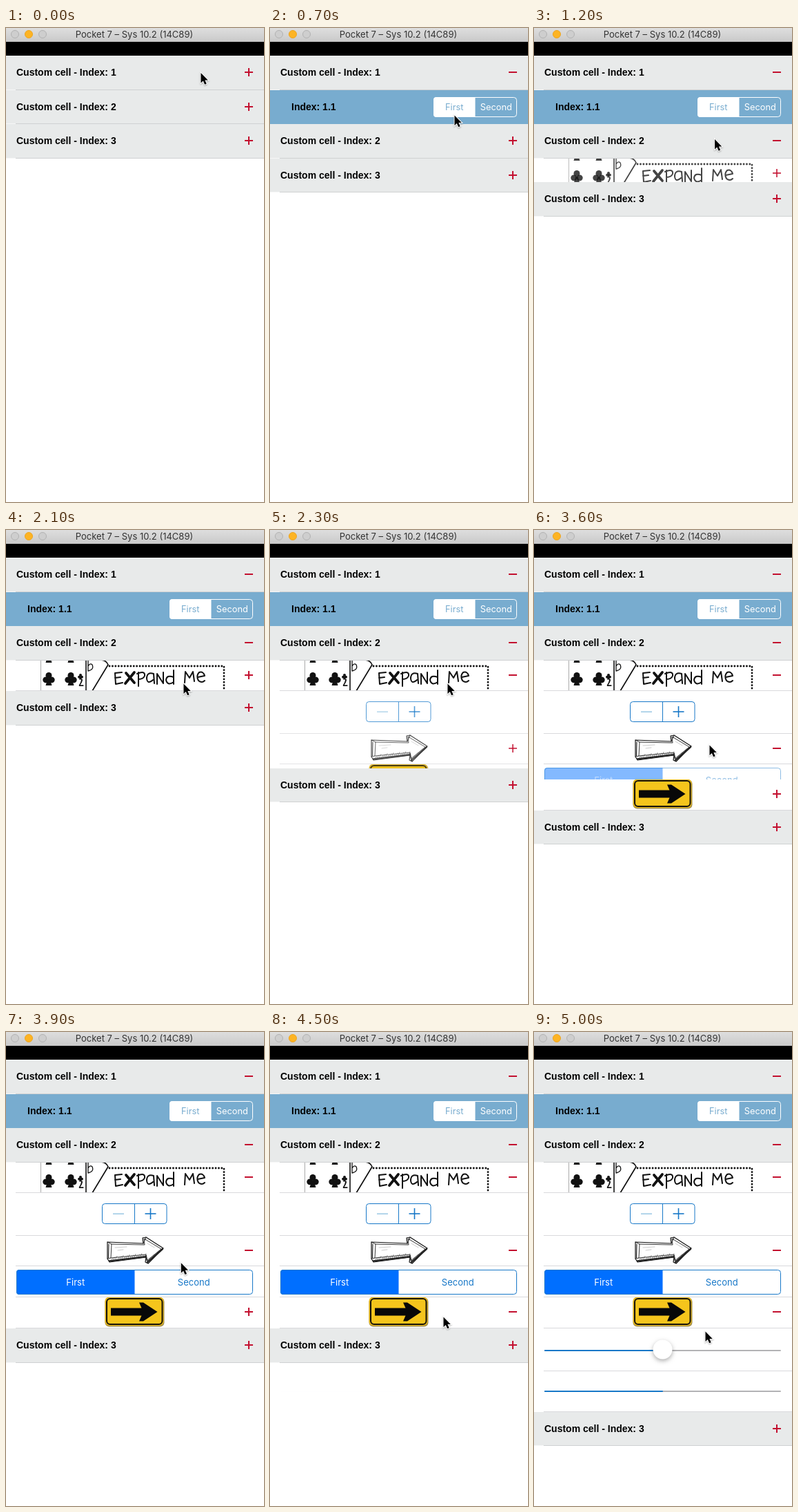
Recreate the animation shown at these times as an HTML page with a canvas. Size 374 by 686 pixels, loop 5100 ms.

```html
<!DOCTYPE html>
<html lang="en">
<head>
<meta charset="utf-8">
<title>Expandable table</title>
<style>
html, body { margin: 0; width: 374px; height: 686px; overflow: hidden; background: #fff; }
canvas { display: block; }
</style>
</head>
<body>
<canvas id="stage" width="374" height="686"></canvas>
<script>
const ctx = document.getElementById('stage').getContext('2d');
const LOOP = 5100, STEP = 100, SLIDE = 300;
const GREY = '#e8eaea', SKY = '#78accf', RED = '#c3102f', BLUE = '#1878c8', INK = '#111';
const UI = 'Inter, sans-serif';
const BOLD = 'bold 14px "Liberation Sans", Arial, sans-serif';

// Start time of each group's expansion
const opens = { first: 150, second: 990, card: 2100, sketch: 3453, sign: 4490 };

// Cursor tip: time, x, y
const cursorKeys = [
  [0, 282.5, 65], [400, 282.5, 65], [700, 267.5, 126.5], [950, 262, 161], [1250, 262, 161],
  [1800, 257.5, 222.5], [2750, 257.5, 222.5], [3350, 254.5, 311.5], [3700, 254.5, 311.5],
  [4350, 251.5, 412.5], [4750, 251.5, 412.5], [5000, 248.5, 433.5]
];

const smooth = u => { u = Math.min(1, Math.max(0, u)); return u * u * (3 - 2 * u); };
const progress = (group, t) => group ? smooth((t - opens[group]) / SLIDE) : 1;

function rect(x, y, w, h, color) {
  ctx.fillStyle = color;
  ctx.fillRect(x, y, w, h);
}

function box(x, y, w, h, r, fill, stroke, width = 1) {
  ctx.beginPath();
  ctx.roundRect(x, y, w, h, r);
  if (fill) { ctx.fillStyle = fill; ctx.fill(); }
  if (stroke) { ctx.strokeStyle = stroke; ctx.lineWidth = width; ctx.stroke(); }
}

function line(d, color, width) {
  ctx.strokeStyle = color;
  ctx.lineWidth = width;
  ctx.stroke(new Path2D(d));
}

function shape(d, color) {
  ctx.fillStyle = color;
  ctx.fill(new Path2D(d));
}

function disc(x, y, r, color) {
  ctx.beginPath();
  ctx.arc(x, y, r, 0, 7);
  ctx.fillStyle = color;
  ctx.fill();
}

function label(text, x, y, font, color, align = 'left') {
  ctx.font = font;
  ctx.fillStyle = color;
  ctx.textAlign = align;
  ctx.fillText(text, x, y);
}

function toggle(y, open) {
  rect(346, y - 1, 12, 2, RED);
  if (!open) rect(351, y - 6, 2, 12, RED);
}

function segments(x, y, w, h, main, fill, onText, offText, font) {
  box(x, y, w / 2, h, [4, 0, 0, 4], fill);
  box(x + .5, y + .5, w - 1, h - 1, 4, null, main);
  const base = y + h / 2 + 4.5;
  label('First', x + w / 4, base, font, onText, 'center');
  label('Second', x + w * .75, base, font, offText, 'center');
}

const header = n => () => label('Custom cell - Index: ' + n, 15, 30, BOLD, '#000');

function nested() {
  label('Index: 1.1', 31, 30, BOLD, '#000');
  segments(237, 11, 121, 29, '#fff', '#fff', SKY, '#fff', '12.8px ' + UI);
}

function club(x, y, s) {
  ctx.save();
  ctx.translate(x, y);
  ctx.scale(s, s);
  disc(0, -4.5, 4.5, INK);
  disc(-4.3, 1.8, 4.4, INK);
  disc(4.3, 1.8, 4.4, INK);
  shape('M-1.5 0H1.5L4.5 10H-4.5Z', INK);
  ctx.restore();
}

function card() {
  rect(50, 1, 1, 44, '#aaa');
  for (const x of [62, 94]) {
    club(x, -6, 1);
    club(x, 27, 1);
  }
  club(108, 24, .45);
  ctx.save();
  ctx.translate(109, 34);
  ctx.rotate(Math.PI);
  label('7', 0, 6, 'bold 14px "Liberation Sans", sans-serif', INK, 'center');
  ctx.restore();
  ctx.lineCap = ctx.lineJoin = 'round';
  line('M116 0V45', INK, 1.6);
  line('M119 0V16Q128 14 125 7Q122 4 119 9', INK, 1.3);
  line('M138 0Q146 1 148 7L125 45', INK, 1.7);
  ctx.setLineDash([.1, 4.3]);
  line('M150 9H316V45', INK, 2.8);
  ctx.setLineDash([]);
  line('M168 18L158 19 159 35 169 33M158 26L166 25', INK, 2);
  line('M174 19L186 33M186 18L173 34', INK, 3.8);
  line('M192 18V38M190 20Q202 15 201 23Q199 28 192 28', INK, 2);
  line('M214 20Q204 17 204 27Q205 36 213 29M214 20L215 34', INK, 2);
  line('M219 35V20L228 34V18M243 15V35M243 25Q233 21 232 29Q234 38 243 32', INK, 2);
  line('M259 33L260 17 266 26 271 17 273 31', INK, 2);
  line('M278 25L288 23Q286 16 280 18Q275 23 279 30Q284 34 288 30', INK, 2);
}

function stepper() {
  box(139.5, 16.5, 93.5, 29, 4, null, BLUE);
  rect(186, 17, 1, 28, BLUE);
  rect(155, 30.5, 16, 1.3, '#8bbfe0');
  rect(201.5, 30.2, 16, 1.6, BLUE);
  rect(208.7, 23, 1.6, 16, BLUE);
}

function sketch() {
  ctx.lineCap = ctx.lineJoin = 'round';
  line('M147 10L199 12 198 4 203 3 228 19 206 41 202 39 203 32 150 39 147 34Z', '#111', 1.2);
  line('M147 10L153 13 152 33 147 34M153 13L201 14 200 5 225 20 204 37 203 28 152 33', '#222', .9);
  line('M150 37.5L203 31M205 39L227 20', '#222', 2.4);
  line('M149 13L148.5 33M199 12L203 3M203 29L206 41', '#333', 1.2);
  let hatch = '';
  for (let i = 0; i < 17; i++) {
    const x = 152 + i * 3, y = 34 - i * .32;
    hatch += `M${x} ${y + 3}l3 ${-4 - i % 3}`;
  }
  line(hatch, '#555', .7);
  line('M158 18L175 17M162 22L170 21M205 12L215 18', '#aaa', .6);
}

function sign() {
  box(143.5, 1.5, 86, 42, 6, '#a49050');
  box(143.5, .6, 85, 41.5, 6, '#e7b91c');
  box(146, 3, 80.5, 37, 5, '#f5c51c', '#15120a', 2);
  shape('M152 16.5H196.5L193 8.5H199L219.5 22 199 35.5H193L196.5 27.5H152Z', '#080808');
}

const segmentRow = () =>
  segments(15, 6, 343, 36, BLUE, '#006fff', '#fff', BLUE, '13px ' + UI);

function track(y) {
  box(15, y, 343, 2, 1, '#b3b3b5');
  box(15, y, 172, 2, 1, BLUE);
}

function slider() {
  track(32);
  ctx.save();
  ctx.shadowColor = 'rgba(0,0,0,.32)';
  ctx.shadowBlur = 6;
  ctx.shadowOffsetY = 2.5;
  disc(186.5, 31.5, 14, '#fff');
  ctx.restore();
}

const rows = [
  { h: 49.4, bg: GREY, draw: header(1), opens: 'first' },
  { h: 49.4, bg: SKY, draw: nested, group: 'first' },
  { h: 49.4, bg: GREY, draw: header(2), opens: 'second' },
  { h: 44.5, draw: card, group: 'second', opens: 'card' },
  { h: 61.9, draw: stepper, group: 'card' },
  { h: 44.3, draw: sketch, group: 'card', opens: 'sketch' },
  { h: 45, draw: segmentRow, group: 'sketch' },
  { h: 44.8, draw: sign, group: 'card', opens: 'sign' },
  { h: 62, draw: slider, group: 'sign' },
  { h: 58.8, draw: () => track(29), group: 'sign' },
  { h: 49.4, bg: GREY, draw: header(3), opens: 'third' }
];

function drawRow(row, top, alpha, t) {
  const y = Math.round(top), h = Math.round(top + row.h) - y;
  ctx.save();
  ctx.globalAlpha = alpha;
  ctx.translate(0, y);
  ctx.beginPath();
  ctx.rect(0, 1, 374, h);
  ctx.clip();
  rect(0, 1, 374, h, row.bg || '#fff');
  row.draw();
  if (row.opens) toggle(row.bg ? 25 : 22, t > opens[row.opens]);
  if (row.bg !== SKY) {
    rect(0, h, 14, 1, row.bg ? '#f6f7f7' : '#fff');
    rect(14, h, 360, 1, row.bg ? '#cfd1d2' : '#d9d9dc');
  }
  ctx.restore();
}

function drawTable(t) {
  const placed = rows.map((row, i) => {
    const p = progress(row.group, t);
    const top = rows.slice(0, i).reduce((sum, r) =>
      sum + r.h * (row.group && r.group === row.group ? 1 : progress(r.group, t)), 39.4);
    return { row, top, p };
  });
  // Rows still fading in lie beneath the rows that slide away.
  for (const { row, top, p } of placed) if (p > 0 && p < 1) drawRow(row, top, p, t);
  for (const { row, top, p } of placed) if (p === 1) drawRow(row, top, 1, t);
}

function drawWindow() {
  const bar = ctx.createLinearGradient(0, 0, 0, 20);
  bar.addColorStop(0, '#dedede');
  bar.addColorStop(1, '#c9c9c9');
  rect(0, 0, 374, 20, bar);
  rect(0, 20, 374, 20, '#000');
  for (const x of [13, 33, 53]) {
    const lit = x === 33;
    box(x - 5.5, 3.5, 11, 11, 5.5, lit ? '#fdb424' : '#cecece', lit ? '#eda520' : '#b2b2b2');
  }
  label('Pocket 7 – Sys 10.2 (14C89)', 186, 14, '13px ' + UI, '#333', 'center');
}

function drawCursor(t) {
  let i = 1;
  while (i < cursorKeys.length - 1 && cursorKeys[i][0] < t) i++;
  const [t0, x0, y0] = cursorKeys[i - 1], [t1, x1, y1] = cursorKeys[i];
  const u = smooth((t - t0) / (t1 - t0));
  const arrow = 'M0 0V14.5L3.3 11.5 5.6 16.8 8.2 15.7 5.9 10.5H10.3Z';
  ctx.save();
  ctx.translate(x0 + (x1 - x0) * u, y0 + (y1 - y0) * u);
  ctx.shadowColor = 'rgba(0,0,0,.3)';
  ctx.shadowBlur = 2;
  ctx.shadowOffsetY = 1;
  line(arrow, '#fff', 2);
  ctx.shadowColor = 'transparent';
  shape(arrow, '#000');
  ctx.restore();
}

function frame() {
  const t = Math.floor(performance.now() % LOOP / STEP) * STEP;
  rect(0, 0, 374, 686, '#fff');
  drawWindow();
  drawTable(t);
  drawCursor(t);
  requestAnimationFrame(frame);
}
frame();
</script>
</body>
</html>
```
